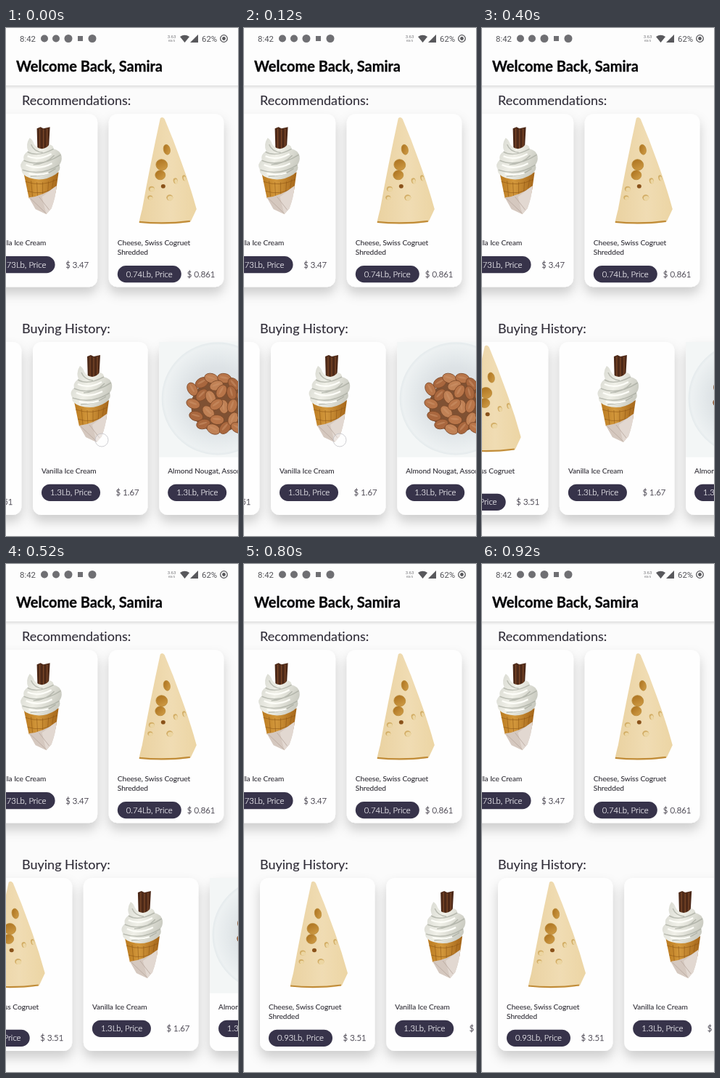
These frames come from a looping animation (320x699 px, 1 s). An HTML page:

```html
<!DOCTYPE html>
<html lang="en">
<head>
<meta charset="utf-8">
<title>Grocery home screen</title>
<style>
  html, body { margin: 0; width: 100%; height: 100%; overflow: hidden; background: #fbfbfb; }
  svg { display: block; width: 100%; height: 100%; }
  text { font-family: Lato, "Open Sans", sans-serif; font-variant-ligatures: none; fill: #37333f; }
  .title { font-size: 20px; font-weight: 700; fill: #050507; stroke: #050507; stroke-width: .3px; }
  .section { font-size: 18px; fill: #302d38; stroke: #302d38; stroke-width: .12px; }
  .name { font-size: 10.1px; fill: #302e36; stroke: #302e36; stroke-width: .1px; }
  .price { font-size: 11.3px; font-weight: 300; text-anchor: end; stroke: #37333f; stroke-width: .25px; }
  .weight { font-size: 11.3px; font-weight: 300; fill: #f4f3f7; stroke: #f4f3f7; stroke-width: .2px; }
  .status { font-family: Roboto, sans-serif; font-size: 11.4px; fill: #55555a; }
  .tiny { font-family: Roboto, sans-serif; fill: #77777b; text-anchor: middle; }
</style>
</head>
<body>
<svg viewBox="0 0 320 699" preserveAspectRatio="none">
  <defs>
    <filter id="shade" x="-25%" y="-20%" width="150%" height="145%">
      <feDropShadow dx="0" dy="9" stdDeviation="8" flood-color="#000" flood-opacity=".19"/>
    </filter>
    <linearGradient id="bar" x1="0" y1="0" x2="0" y2="1">
      <stop stop-color="#000" stop-opacity=".11"/>
      <stop offset="1" stop-color="#000" stop-opacity="0"/>
    </linearGradient>
    <linearGradient id="cream" x1="0" y1=".2" x2="1" y2=".6">
      <stop stop-color="#d6d7cf"/>
      <stop offset=".45" stop-color="#f0f0e8"/>
      <stop offset="1" stop-color="#c8c9bf"/>
    </linearGradient>
    <linearGradient id="wafer">
      <stop stop-color="#b9791f"/>
      <stop offset=".4" stop-color="#d3983c"/>
      <stop offset="1" stop-color="#a5661a"/>
    </linearGradient>
    <linearGradient id="wedge">
      <stop stop-color="#ead2a1"/>
      <stop offset=".55" stop-color="#f0dcb3"/>
      <stop offset="1" stop-color="#ecd5a4"/>
    </linearGradient>
    <linearGradient id="hole" x1="0" y1="0" x2="1" y2="1">
      <stop stop-color="#a86e1b"/>
      <stop offset="1" stop-color="#d3a04a"/>
    </linearGradient>
    <radialGradient id="bowl">
      <stop offset=".55" stop-color="#dde2e5"/>
      <stop offset=".75" stop-color="#e5eaec"/>
      <stop offset=".95" stop-color="#edf1f2"/>
      <stop offset="1" stop-color="#e4eaec"/>
    </radialGradient>

    <g id="cone">
      <path d="M75 20 L80 18 L84 20 L93 18 L91 54 L76 56Z" fill="#4d2918"/>
      <path d="M79 20V52M84 21V54M89 20V53" stroke="#7b4828" stroke-width="1.3"/>
      <path d="M57 82 Q81 92 105 80 L101 108 Q84 118 64 116Z" fill="url(#wafer)"/>
      <path d="M59 93Q82 101 103 90M62 106Q82 113 101 101M67 92l2 22M75 94l1 21M83 94v20M91 93l-1 17M98 90l-2 12"
            fill="none" stroke="#8f5715" stroke-opacity=".6"/>
      <path d="M64 115 Q84 113 102 99 Q101 114 95 130 L88 138 L73 131Z" fill="#d5c8bf"/>
      <path d="M82 114 L102 99 Q101 114 95 130 L88 138Z" fill="#e2d8d1"/>
      <path d="M66 116L88 137M78 114L92 132" stroke="#b8a89e" stroke-width=".8"/>
      <path d="M65 33 Q69 35 71 41 Q74 47 82 48 Q89 47 92 42 Q98 43 98 48 Q107 50 109 58 Q110 65 106 70
               Q109 77 101 83 Q84 94 65 88 Q53 84 54 76 Q50 69 57 63 Q55 56 63 51 Q59 42 65 33Z" fill="url(#cream)"/>
      <path d="M62 52Q76 60 98 48M57 64Q80 74 108 56M55 77Q81 86 106 70M67 42Q71 52 83 53M70 70Q88 69 99 57M66 86Q88 85 101 75"
            fill="none" stroke="#a4a69b" stroke-width="1.5" stroke-opacity=".65"/>
      <path d="M62 58Q77 65 95 55M60 70Q77 78 96 68M64 82Q77 86 91 81" fill="none" stroke="#fdfdf8" stroke-width="2.2"/>
    </g>

    <g id="cheese">
      <path d="M71 6 Q74 3 77 7 Q89 35 100 66 Q112 98 121 131 L113 148 Q96 152 72 151 L42 149 Q42 146 46 131 Q57 70 71 6Z" fill="url(#wedge)"/>
      <path d="M42 148.500 Q77 152 112 147.500" fill="none" stroke="#c18c38" stroke-width="2.200"/>
    </g>

    <g id="nuts">
      <rect width="158.5" height="158.5" fill="#f3f6f6"/>
      <circle cx="81" cy="78" r="77.5" fill="url(#bowl)"/>
      <ellipse cx="83" cy="88" rx="39" ry="36" fill="#7f5133"/>
    </g>
  </defs>

  <rect width="320" height="699" fill="#fbfbfb"/>
  <g id="top"></g>
  <g id="history"></g>
  <rect y="79" width="320" height="5" fill="url(#bar)"/>
  <rect width="320" height="79" fill="#fdfdfd"/>
  <text class="title" x="14" y="60">Welcome Back, Samira</text>
  <text class="section" x="22" y="106">Recommendations:</text>
  <text class="section" x="22" y="419.5">Buying History:</text>

  <text class="status" x="19" y="18.5">8:42</text>
  <text class="status" x="270" y="18.5">62%</text>
  <text class="tiny" x="228.5" y="14" font-size="6">3.63</text>
  <text class="tiny" x="228.5" y="19" font-size="4">KB/S</text>
  <g fill="#6f6f73">
    <circle cx="53" cy="14.5" r="5"/>
    <circle cx="69" cy="14.5" r="5"/>
    <circle cx="86" cy="14.5" r="5.5"/>
    <rect x="99" y="11" width="7" height="7"/>
    <circle cx="119" cy="14.5" r="5.5"/>
  </g>
  <g fill="#58585c">
    <path d="M240 12Q246.5 7.5 253 12L246.5 20Z"/>
    <path d="M254 20L265 9V20Z"/>
    <circle cx="300.5" cy="14.5" r="2.4"/>
    <circle cx="300.5" cy="14.5" r="4.8" fill="none" stroke="#58585c" stroke-width="1.3"/>
  </g>
  <circle id="touch" r="9" fill="#fff" fill-opacity=".35" stroke="#bdbdc2" stroke-opacity=".7"/>
</svg>
<script>
const $ = id => document.getElementById(id);
const PITCH = 174.2, CARD_W = 158.5, PILL_H = 23.2;

const ellipse = (x, y, rx, ry, fill, turn = 0, extra = "") =>
  `<ellipse cx="${x}" cy="${y}" rx="${rx}" ry="${ry}" fill="${fill}" transform="rotate(${turn} ${x} ${y})" ${extra}/>`;

// x, y, rx, ry, tilt
const deepHoles = [[80, 49, 4.5, 7, -12], [73, 70, 8, 7.5, 20], [71, 84, 7, 6.5, 0]];
const paleHoles = [[59, 103, 4, 3.5, 0], [84, 115, 4.5, 4, 0], [57, 115, 3.5, 3, 0], [92, 92, 3, 4, -15], [104, 88, 2.5, 4, -15]];
$("cheese").innerHTML +=
  paleHoles.map(([x, y, a, b, t]) => ellipse(x, y, a, b, "#d2ad65", t) + ellipse(x + .8, y + .9, a - .8, b - .9, "#ecd6a3", t)).join("") +
  deepHoles.map(([x, y, a, b, t]) => ellipse(x, y, a, b, "url(#hole)", t, 'stroke="#b98937" stroke-width=".7"')).join("") +
  ellipse(75, 99.5, 3, 2.8, "#8a521a");

// x, y, tilt
const almonds = [
  [46, 65, 60], [59, 56, -30], [72, 50, 15], [90, 50, 10], [103, 58, 50], [79, 60, -20],
  [47, 85, 20], [59, 73, -45], [71, 76, 65], [86, 68, -60], [100, 70, 75], [89, 89, 80],
  [101, 88, -70], [51, 102, 15], [68, 96, 45], [79, 86, -35], [61, 113, -15], [75, 120, 25],
  [80, 107, 5], [91, 118, -50], [102, 106, -65], [108, 118, 30], [115, 76, 40], [117, 98, -30]
];
$("nuts").innerHTML += almonds.map(([x, y, t], i) =>
  ellipse(x, y, 9.6, 6.6, ["#b87549", "#a9673e", "#c08155"][i % 3], t, 'stroke="#7d4a2a" stroke-width=".8"') +
  ellipse(x - .5, y - 1, 6, 1.4, "#cd966c", t, 'opacity=".5"')).join("");

function card(x, y, { art, lines, weight, price }) {
  const mid = lines.length > 1 ? 220.3 : 207.3;
  const label = lines.map((s, i) => `<text class="name" x="12" y="${181 + 13 * i}">${s}</text>`).join("");
  return `<g transform="translate(${x} ${y})">
    <rect width="${CARD_W}" height="238" rx="12" fill="#fefefe" filter="url(#shade)"/>
    <use href="#${art}"/>${label}
    <rect x="12" y="${mid - PILL_H / 2}" width="${weight.length > 5 ? 88 : 81}" height="${PILL_H}" rx="${PILL_H / 2}" fill="#37334a"/>
    <text class="weight" x="24" y="${mid + 4}">${weight}, Price</text>
    <text class="price" x="146.5" y="${mid + 4}">$ ${price}</text>
  </g>`;
}

const iceCream = (weight, price) => ({ art: "cone", lines: ["Vanilla Ice Cream"], weight, price });
const swiss = (weight, price) => ({ art: "cheese", lines: ["Cheese, Swiss Cogruet", "Shredded"], weight, price });
const mixed = { art: "nuts", lines: ["Almond Nougat, Assorted"], weight: "1.3Lb", price: "2.48" };

const row = (x, y, items) => items.map((item, i) => card(x + i * PITCH, y, item)).join("");
$("top").innerHTML = row(-32.4, 118.3, [iceCream("0.73Lb", "3.47"), swiss("0.74Lb", "0.861")]);
$("history").innerHTML = row(0, 432, [swiss("0.93Lb", "3.51"), iceCream("1.3Lb", "1.67"), mixed]);

// The recorded scroll holds each position until the next key.
const LOOP = 1000;
const keys = [
  { at: 0, x: -137.2, touch: [132, 567] },
  { at: 400, x: -67.3 },
  { at: 600, x: -55.3, touch: [56, 527] },
  { at: 800, x: 22 }
];

function draw(ms) {
  const key = keys.findLast(k => k.at <= ms % LOOP);
  $("history").setAttribute("transform", `translate(${key.x} 0)`);
  const [x, y] = key.touch || [-50, -50];
  $("touch").setAttribute("cx", x);
  $("touch").setAttribute("cy", y);
}

let start;
function tick(now) {
  start ??= now;
  draw(now - start);
  requestAnimationFrame(tick);
}
draw(0);
requestAnimationFrame(tick);
</script>
</body>
</html>
```
